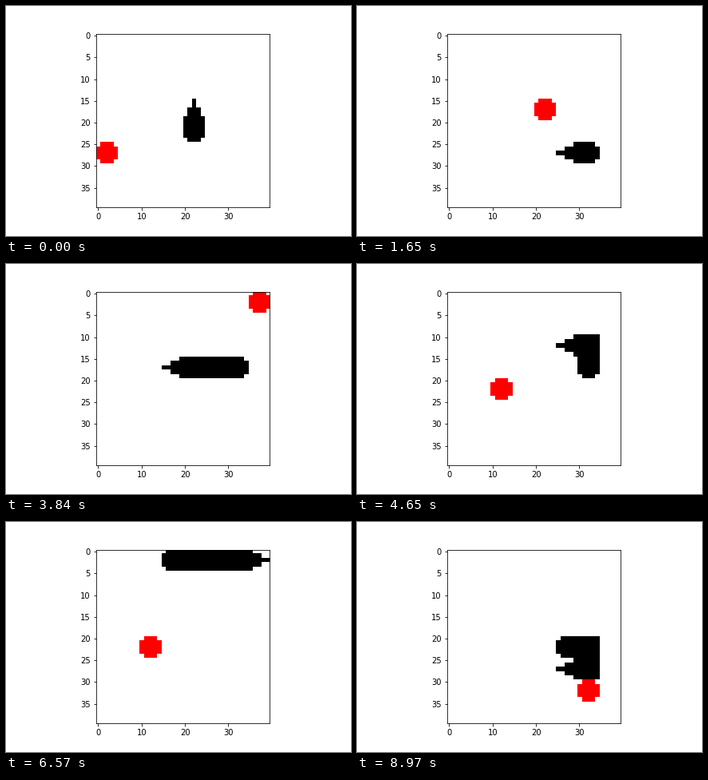
These frames come from a looping animation (432 by 288 pixels, 9 s). A matplotlib script:

```python
import numpy as np
import matplotlib.pyplot as plt
from matplotlib.animation import FuncAnimation

CELLS, SIZE = 8, 5
FRAMES, INTERVAL = 300, 30
HEADINGS = {"U": (0, -1), "L": (-1, 0), "D": (0, 1), "R": (1, 0)}
TURNS = {v: k for k, v in enumerate(HEADINGS.values())}

# Each game: heading, starting cell, then the apples in order (column and row).
# The last apple is never reached; the snake runs straight into the wall.
GAMES = [
    "U 43 05 36 72 21",
    "U 24 51 64 13 45",
    "D 62 04 01 52",
    "L 65 43 11 06 53",
    "R 53 76 32 65 13",
    "L 52 24 02",
    "L 44 13 40 25",
    "R 37 75 33 70 54 21",
    "R 25 62 24 57 33",
    "U 16 43 61 23",
    "L 55 11 43 06 52",
    "R 37 65 31 70 24",
    "U 54 23 65 31 53 22",
    "U 14 30 61 74 35",
    "L 34 21 53 75 22",
    "R 24 72 51 45 66 53",
    "D 42 64 55 66",
]

# Sprites face up and are rotated to the heading.
ROWS = np.arange(SIZE)[:, None]
OFFSET = abs(np.arange(SIZE) - 2)[None, :]
HEAD = OFFSET <= ROWS // 2
TAIL = (ROWS < SIZE - 1) | (OFFSET < 2)
BODY = np.ones((SIZE, SIZE), bool)
APPLE = TAIL & TAIL[::-1]


def cell(code):
    return int(code[0]), int(code[1])


def add(a, b):
    return a[0] + b[0], a[1] + b[1]


def sub(a, b):
    return a[0] - b[0], a[1] - b[1]


def steer(head, heading, target):
    """Keep straight while it brings the target closer, else turn to it."""
    gap = sub(target, head)
    if gap[0] * heading[0] + gap[1] * heading[1] > 0:
        return heading
    if heading[0]:
        return 0, int(np.sign(gap[1]))
    return int(np.sign(gap[0])), 0


def play(game):
    """Yield (snake, heading, apple) for every step of one game."""
    way, start, *apples = game.split()
    heading = HEADINGS[way]
    apples = [cell(a) for a in apples]
    snake = [cell(start), sub(cell(start), heading)]
    while True:
        yield list(snake), heading, apples[0]
        if len(apples) > 1:
            heading = steer(snake[0], heading, apples[0])
        head = add(snake[0], heading)
        if not all(0 <= v < CELLS for v in head):
            return
        snake.insert(0, head)
        if head == apples[0] and len(apples) > 1:
            apples.pop(0)
        else:
            snake.pop()


def stamp(board, pos, sprite, color, heading=(0, -1)):
    x, y = pos[0] * SIZE, pos[1] * SIZE
    mask = np.rot90(sprite, TURNS[heading])
    board[y:y + SIZE, x:x + SIZE][mask] = color


def render(snake, heading, apple):
    board = np.full((CELLS * SIZE, CELLS * SIZE, 3), 255, np.uint8)
    stamp(board, apple, APPLE, (255, 0, 0))
    stamp(board, snake[0], HEAD, 0, heading)
    for part in snake[1:-1]:
        stamp(board, part, BODY, 0)
    stamp(board, snake[-1], TAIL, 0, sub(snake[-2], snake[-1]))
    return board


states = [state for game in GAMES for state in play(game)][:FRAMES]

plt.rcParams["font.family"] = "DejaVu Sans"
fig, ax = plt.subplots(figsize=(6, 4), dpi=72)
fig.subplots_adjust(left=0.125, right=0.9, bottom=0.125, top=0.88)
image = ax.imshow(render(*states[0]), interpolation="nearest")
ax.set_xticks(range(0, 40, 10))
ax.set_yticks(range(0, 40, 5))


def update(i):
    image.set_data(render(*states[i]))
    return [image]


anim = FuncAnimation(fig, update, frames=FRAMES, interval=INTERVAL,
                     repeat=True, repeat_delay=0)
plt.show()
```
